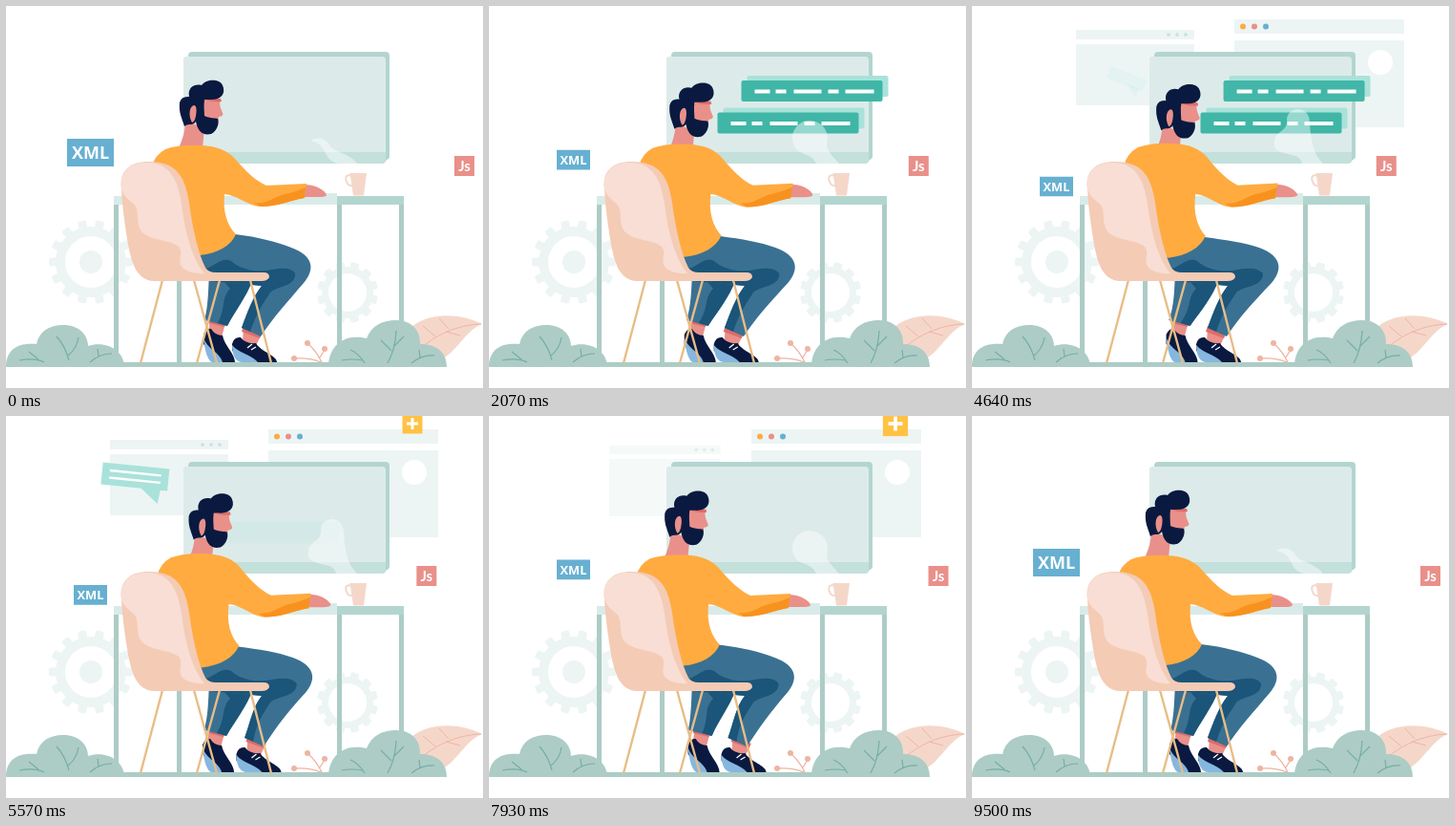
Recreate the animation shown at these times as an HTML page with a canvas. Size 500 by 400 pixels, loop 9570 ms.

```html
<!DOCTYPE html>
<html lang="en">
<head>
<meta charset="utf-8">
<title>Developer at a desk</title>
<style>
html, body { margin: 0; width: 100%; height: 100%; overflow: hidden; background: #fff; }
canvas { display: block; width: 500px; height: 400px; }
</style>
</head>
<body>
<canvas id="stage"></canvas>
<script>
const LOOP = 9570;
const canvas = document.getElementById('stage');
const ratio = window.devicePixelRatio || 1;
canvas.width = 500 * ratio;
canvas.height = 400 * ratio;
const ctx = canvas.getContext('2d');

const C = {
  mist: '#edf5f4', screen: '#dcebe9', strip: '#c3e0db', frame: '#b3d5cf', desk: '#d9ebe8',
  bush: '#adccc6', vein: '#76aea4', teal: '#40b6a7', aqua: '#a9e2da',
  skin: '#e9908a', sock: '#df6c68', navy: '#0a193f', shirt: '#ffab40', cuff: '#f8921f',
  denim: '#3a7192', deep: '#1b5579', sole: '#86b7df', chair: '#f4cbb5', pale: '#f8ded4',
  wood: '#e8bd87', leaf: '#f5d7ca', blush: '#efb4a3', blue: '#67b0d1', yellow: '#ffc243'
};

const lerp = (a, b, k) => a + (b - a) * k;
const ease = (t, from, to) => {
  const u = Math.min(1, Math.max(0, (t - from) / (to - from)));
  return (1 - Math.cos(Math.PI * u)) / 2;
};
const visit = (t, inFrom, inTo, outFrom, outTo) => ease(t, inFrom, inTo) - ease(t, outFrom, outTo);
const pulse = (t, from, to) =>
  t > from && t < to ? Math.sin(Math.PI * (t - from) / (to - from)) ** 2 : 0;

function fill(d, color) {
  ctx.fillStyle = color;
  ctx.fill(new Path2D(d));
}
function stroke(d, color, width) {
  ctx.strokeStyle = color;
  ctx.lineWidth = width;
  ctx.stroke(new Path2D(d));
}
function box(x, y, w, h, color, r = 0) {
  ctx.fillStyle = color;
  ctx.beginPath();
  ctx.roundRect(x, y, w, h, r);
  ctx.fill();
}
function dot(x, y, r, color) {
  ctx.fillStyle = color;
  ctx.beginPath();
  ctx.arc(x, y, r, 0, Math.PI * 2);
  ctx.fill();
}
function group(draw, { x = 0, y = 0, scale = 1, turn = 0, alpha = 1 } = {}) {
  if (alpha <= 0.003 || scale <= 0.003) return;
  ctx.save();
  ctx.translate(x, y);
  ctx.rotate(turn);
  ctx.scale(scale, scale);
  ctx.globalAlpha *= alpha;
  draw();
  ctx.restore();
}

function gear(x, y, inner, outer, tip, teeth, hub) {
  group(() => {
    for (let i = 0; i < teeth; i++) {
      box(-4.5, -tip, 9, tip - outer + 3, C.mist, 2);
      ctx.rotate(Math.PI * 2 / teeth);
    }
    ctx.strokeStyle = C.mist;
    ctx.lineWidth = outer - inner;
    ctx.beginPath();
    ctx.arc(0, 0, (inner + outer) / 2, 0, Math.PI * 2);
    ctx.stroke();
    if (hub) dot(0, 0, hub, C.mist);
  }, { x, y, turn: Math.PI / teeth });
}

function windows(t) {
  const right = visit(t, 2100, 3000, 8400, 9300);
  group(() => {
    box(275, 14, 178, 15, C.mist);
    [C.shirt, C.skin, C.blue].forEach((c, i) => dot(284 + 12 * i, 21.5, 3, c));
    box(275, 36, 178, 91, C.mist);
    dot(428, 59, 13, '#fff');
  }, { y: 20 * (1 - right), alpha: right });

  const left = visit(t, 2800, 4000, 7400, 8500);
  group(() => {
    box(-62, -39.5, 124, 10, C.mist);
    for (let i = 0; i < 3; i++) dot(35 + 9 * i, -34.5, 2, '#cfe3e0');
    box(-62, -24.5, 124, 64, C.mist);
  }, { x: 171 + 28 * (1 - left), y: 64.5 + 7 * (1 - left), scale: lerp(0.88, 1, left), alpha: left });
}

function monitor() {
  box(191, 48, 211, 113, C.frame, 4);
  fill('M398 160L402 157L396 165Z', C.frame);
  box(186, 53, 212, 112, C.strip, 4);
  box(186, 53, 212, 100, C.screen, [4, 4, 0, 0]);
}

function codeBar(x, y, shown) {
  group(() => {
    box(6, -5, 148, 22, C.aqua, 2);
    box(0, 0, 148, 22, C.teal, 2);
    [[14, 16], [36, 11], [55, 29], [91, 11], [109, 30]].forEach(([dx, w]) => box(dx, 9.5, w, 4, '#fff'));
  }, { x: x - 40 * (1 - shown), y, alpha: shown });
}

const PLUME = [
  [320,141, 320,140,322,139,325,139, 331,138,336,140,340,147, 344,153,360,154,368,165, 362,165,354,165,348,165, 330,160,340,147,320,141],
  [318,138, 318,130,323,123,330,121, 345,118,355,128,355,140, 352,151,356,152,367,165, 358,165,350,165,343,165, 336,150,320,160,318,138],
  [317,142, 318,130,332,132,330,118, 332,104,354,104,354,122, 355,142,358,155,368,165, 360,165,352,165,346,165, 344,150,314,160,317,142]
];
function steam(t) {
  const s = 2 * visit(t, 0, 4000, 6400, 9500);
  const i = s < 1 ? 0 : 1;
  const n = PLUME[i].map((v, j) => lerp(v, PLUME[i + 1][j], s - i));
  ctx.fillStyle = 'rgba(255,255,255,.45)';
  ctx.beginPath();
  ctx.moveTo(n[0], n[1]);
  for (let j = 2; j < n.length; j += 6) ctx.bezierCurveTo(...n.slice(j, j + 6));
  ctx.fill();
}

function bubble(t) {
  const k = visit(t, 4350, 5500, 6700, 7700);
  group(() => {
    box(-35, -10.5, 70, 23, C.aqua);
    fill('M4 10L28 10L26 27Z', C.aqua);
    box(-27, -4, 54, 2.4, '#fff');
    box(-27, 3.5, 54, 2.4, '#fff');
  }, { x: lerp(167, 135.5, k), y: lerp(78, 62.5, k), scale: lerp(0.5, 1, k), turn: lerp(0.4, 0.1, k), alpha: k });
}

function desk() {
  [113, 179, 347, 412].forEach(x => box(x, 205, 5, 170, C.bush));
  box(113, 199, 304, 9, C.frame);
  box(113, 199, 234, 9, C.desk);
  box(303, 196, 44, 4, C.desk);
  box(113, 373, 304, 5, C.bush);
  fill('M360.500 175H378L375 198.500H364Z', C.leaf);
  stroke('M362 177.500C355 176 355.500 181 357.500 185Q359 189 364 188', C.leaf, 2);
}

function head(p) {
  group(() => {
    fill('M188 120C188 132 185 139 181 149Q195 154 206 149L208 128Z', C.skin);
    fill('M205 95L225 97C223 103 225 107 227.500 113Q227 116 223 116L222 122L207 126L198 112Z', C.skin);
    fill('M208 98Q217 101 226 100L225 97Z', C.sock);
    fill('M187 126C184 116 181 112 182 101Q184 94 192 95C190 85 198 81 205 83C210 76 224 76 227 83C231 92 225 99 213 98L208 98C207 105 208 111 208 115C214 118 219 117 222 118C224 123 221 131 215 134C206 136 201 131 199 121C196 126 192 122 187 126Z', C.navy);
    fill('M197 104C200 104 200 110 199 115Q198 121 195 122C191 115 192 105 197 104Z', C.skin);
  }, { x: 11.5 * p, y: 4.2 * p });
}

function torso(p) {
  ctx.save();
  // The back leans forward and stretches around the elbow height.
  ctx.transform(1, 0, -0.035 * p, 1 + 0.043 * p, 12.25 * p, -8.4 * p);
  fill('M312 187Q321 187 327 190Q335 194 336 198Q335 200 328 200L312 200Z', C.skin);
  fill('M153 168Q156 156 167 150Q181 145 205 146C221 147 232 151 240 160C252 174 262 183 273 188L315 186Q313 193 313 201C295 204 286 210 265 210C252 208 242 198 229 197C227 216 232 230 241 239C236 251 222 259 203 261L165 250Z', C.shirt);
  fill('M260 206C274 208 280 200 292 197C302 195 307 193 314 190L313 201C295 204 286 210 267 210Z', C.cuff);
  ctx.restore();
}

function shoeBack(dx) {
  group(() => {
    fill('M214 328L230 332L226 347L212 342Z', C.skin);
    fill('M214 328L231 332L229 336L212 332Z', C.sock);
    fill('M207 344Q210 337 215 338Q219 345 227 345C229 356 240 364 240 373H222L207 354Z', C.navy);
    fill('M207 347C208 361 212 372 216 373H227C224 362 211 360 207 347Z', C.sole);
  }, { x: dx });
}

function shoeFront(dx) {
  group(() => {
    fill('M249 335L268 343L261 358L248 351Z', C.skin);
    fill('M249 335L268 343L266 348L247 341Z', C.sock);
    fill('M237 354Q239 346 246 347Q251 354 262 353C267 362 284 366 284 373H260L237 361Z', C.navy);
    fill('M237 355C237 366 241 373 248 373H264C256 364 244 364 237 355Z', C.sole);
    stroke('M253 358L258 354M257 360L262 357', '#fff', 1.3);
  }, { x: dx });
}

function legs(p, slide) {
  const back = -3.5 * p + 0.33 * slide;
  const front = slide - 2 * p;
  const shin = 0.5 * slide;
  const k = 2 * p;
  const waist = 239 + 3 * p;
  shoeBack(back);
  shoeFront(front);
  fill(`M213 280L258 280C250 300 241 318 ${232 + back} 335L${208 + back / 2} 329C212 315 212 297 213 280Z`, C.denim);
  fill(`M228 288H258C252 305 241 318 ${232 + back} 335L${222 + back} 332C231 315 225 306 235 296Z`, C.deep);
  fill(`M203 282V260Q230 257 ${240 + 4 * p} ${waist}C265 ${waist + 3} 284 247 ${299 + k} 253C${323 + k} 262 ${324 + k} 276 ${312 + k} 290C295 310 ${280 + shin} 326 ${267 + shin} 346L${247 + shin} 337C${253 + shin} 321 258 306 268 293L215 288Z`, C.denim);
  fill(`M205 277C220 272 226 262 236 267C247 277 264 279 279 276Q298 272 ${303 + k} 280C${304 + k} 294 284 293 277 300C270 311 262 322 ${256 + shin} 341L${247 + shin} 337C${253 + shin} 321 258 306 268 293L215 288Z`, C.deep);
}

function chair() {
  stroke('M164 287L141 374M197 287L221 374M224 287L200 374M256 287L278 374', C.wood, 2.4);
  fill('M121 192C118 169 134 163 150 163C179 163 188 179 192 206C196 236 202 260 209 274Q212 279 220 279H270Q276 279 276 284Q274 288 268 288H155C137 287 132 270 128 250C124 225 122 210 121 192Z', C.chair);
  fill('M121 192C118 171 132 164 148 164C171 164 180 181 184 207C188 240 196 266 208 280Q194 281 186 275C178 267 187 260 181 252C172 245 158 246 147 240C136 234 139 222 137 213C135 204 126 205 121 192Z', C.pale);
}

function plants() {
  fill('M422 339C438 321 474 320 499 333C482 340 475 358 460 368H430Z', C.leaf);
  stroke('M498 333C472 334 449 345 433 360M464 338L454 327M450 346L437 335M461 341L476 345', C.blush, 1);
  stroke('M331 373Q325 361 317 354M329 368L334 360M330 373Q318 368 303 369', C.blush, 1.3);
  [[316, 353], [334, 359], [302, 369]].forEach(([x, y]) => dot(x, y, 3, C.blush));
  fill('M0 378C0 360 12 352 32 354C35 340 46 334 60 334C76 334 86 344 86 356C104 350 124 360 124 378Z', C.bush);
  fill('M338 378C338 357 353 342 378 348C383 335 394 329 409 329C425 329 435 340 434 354C453 354 462 364 462 378Z', C.bush);
  stroke('M53 346Q62 356 66 371M65 366Q74 359 76 347M14 371Q30 368 40 373M24 362L34 370M88 373Q98 364 111 364M97 367L96 359', C.vein, 1.2);
  stroke('M409 340Q408 360 400 374M407 356L417 346M404 361L393 350M361 360Q370 364 376 374M352 371Q362 369 374 371M425 374Q436 365 449 366M434 368L433 360', C.vein, 1.2);
}

function tag(text, w, h, font, color, place) {
  group(() => {
    box(-w / 2, -h / 2, w, h, color);
    ctx.fillStyle = '#fff';
    ctx.font = font;
    ctx.textAlign = 'center';
    ctx.textBaseline = 'alphabetic';
    ctx.fillText(text, 0, h * 0.15 + 2.3);
  }, place);
}

function tags(t, p) {
  tag('XML', 49, 29, 'bold 18px "Open Sans", sans-serif', C.blue, {
    x: 88.5,
    y: 153.5 + 35.5 * visit(t, 1000, 4500, 5000, 9200),
    scale: 1 - 0.286 * visit(t, 0, 1500, 9000, 9500)
  });
  tag('Js', 21, 21, 'bold 15px Lato, sans-serif', C.skin, {
    x: 480.5 - 47 * p, y: 167.5, scale: 1 + 0.48 * pulse(t, 3000, 4500)
  });
  group(() => {
    box(-10.5, -10.5, 21, 21, C.yellow);
    box(-6, -1.5, 12, 3, '#fff');
    box(-1.5, -6, 3, 12, '#fff');
  }, { x: 426, y: 8, scale: visit(t, 4700, 5400, 8450, 9000) * (1 + 0.25 * pulse(t, 7450, 8450)) });
}

function draw(t) {
  const lean = visit(t, 0, 3500, 4200, 9500);
  const slide = 13 * visit(t, 4700, 6500, 6500, 9500);
  ctx.setTransform(ratio, 0, 0, ratio, 0, 0);
  ctx.fillStyle = '#fff';
  ctx.fillRect(0, 0, 500, 400);
  gear(89, 268, 27, 37, 44, 14, 12);
  gear(358, 300, 20, 27, 32, 12);
  windows(t);
  monitor();
  codeBar(264.5, 78, visit(t, 50, 1000, 4560, 5400));
  codeBar(239.5, 111.5, visit(t, 400, 1500, 4700, 5700));
  steam(t);
  bubble(t);
  desk();
  head(lean);
  legs(lean, slide);
  torso(lean);
  chair();
  plants();
  tags(t, lean);
}

const start = performance.now();
function tick() {
  draw((performance.now() - start) % LOOP);
  requestAnimationFrame(tick);
}
tick();
</script>
</body>
</html>
```
